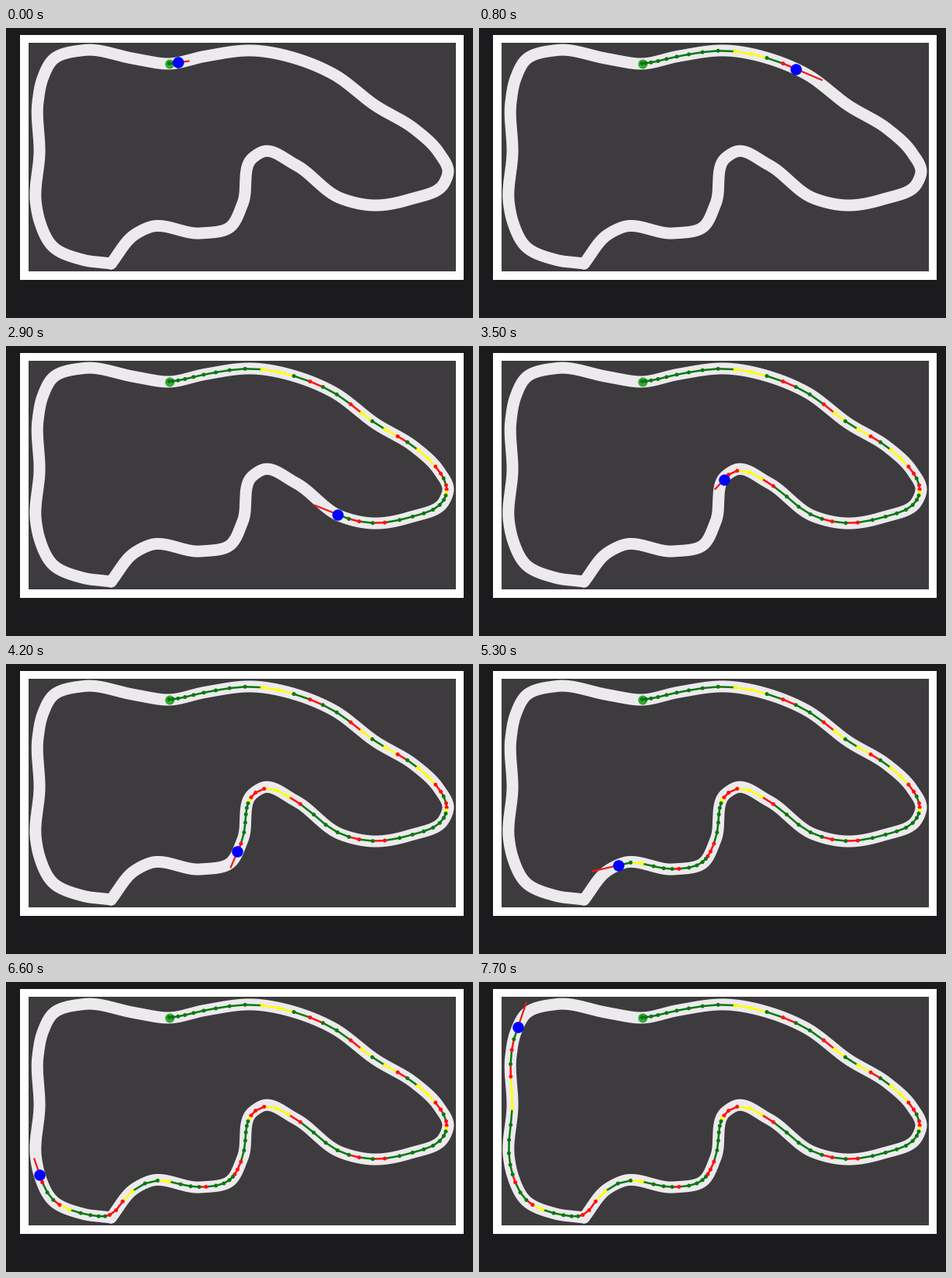
A matplotlib script for the animation above (7.8 s loop, 600 px wide and 373 px high).

```python
import numpy as np
import matplotlib.pyplot as plt
from matplotlib.animation import FuncAnimation
from matplotlib.collections import LineCollection
from matplotlib.patches import Rectangle

W, H, DPI = 600, 373, 100
FRAMES, INTERVAL = 78, 100
PX = 72 / DPI  # points per pixel
START = (210, 46)

# Bends of the road, clockwise from the sharp corner back to it
BENDS = [
    (135, 303), (98, 298), (60, 281), (43, 248), (38.5, 226), (43, 160),
    (41, 95), (47, 65), (60, 41), (100, 28.5), (165, 39.5), START,
    (255, 36.5), (318, 29), (375, 40), (420, 59), (475, 100), (525, 130),
    (556, 160), (568, 185), (562, 201), (520, 220), (470, 228), (430, 219),
    (372, 176), (330, 159), (317, 167), (304, 226), (288, 256), (250, 264),
    (185, 256), (165, 266), (135, 303),
]

# Go, roll or brake at each step, with the change of speed each one gives
PEDALS = ("gggggggggyygrggrygyrgyyrrgrrygggggggrgrggggryyrrry"
          "gggggrrrggggrgggyggyrrrggggyrggrgggggyyrgrgg")
PAINT = {"g": "#08780f", "y": "#ffff00", "r": "#ff1010"}
PUSH = {"g": 2.2, "y": -0.8, "r": -4}
COLORS = np.array([PAINT[p] for p in PEDALS])


def arc(points):
    """Distance travelled along a polyline at each of its points."""
    return np.r_[0, np.cumsum(np.hypot(*np.diff(points, axis=0).T))]


def walk(points, dist):
    """Points at the given distances along a polyline."""
    s = arc(points)
    return np.column_stack([np.interp(dist, s, c) for c in points.T])


def spline(knots, parts=30):
    """Cubic Hermite curve with tangents taken over chord length."""
    k = np.array(knots, float)
    t = arc(k)
    m = np.gradient(k, t, axis=0)
    h = np.diff(t)[:, None, None]
    u = np.linspace(0, 1, parts, endpoint=False)[None, :, None]
    a, b, p, q = k[:-1, None], k[1:, None], m[:-1, None], m[1:, None]
    curve = (a + (b - a) * u * u * (3 - 2 * u)
             + h * u * (1 - u) * (p * (1 - u) - q * u))
    return np.vstack([curve.reshape(-1, 2), k[-1]])


def racing_line(road, reach=15):
    """The road averaged over a short stretch, so that it cuts corners."""
    even = walk(road, np.arange(arc(road)[-1]))
    line = np.mean([np.roll(even, j, axis=0)
                    for j in range(-reach, reach + 1)], axis=0)
    first = np.argmin(np.hypot(*(line - START).T))
    return np.roll(line, -first, axis=0)


def drive(line):
    """Car positions, one per pedal, plus the start."""
    speed, dist = 2.5, [0]
    for pedal in PEDALS:
        speed = np.clip(speed + PUSH[pedal], 4, 22)
        dist.append(dist[-1] + speed)
    return walk(line, dist)


def box(x0, y0, x1, y1, color):
    ax.add_patch(Rectangle((x0, y0), x1 - x0, y1 - y0, color=color, lw=0))


def disc(xy, size, color, z):
    return ax.plot(*xy, "o", ms=size * PX, mfc=color, mew=0, zorder=z)[0]


fig = plt.figure(figsize=(W / DPI, H / DPI), dpi=DPI, facecolor="#1b1a1c")
ax = fig.add_axes([0, 0, 1, 1])
ax.set_xlim(0, W)
ax.set_ylim(H, 0)
ax.axis("off")

road = spline(BENDS)
path = drive(racing_line(road))
links = np.stack([path[:-1], path[1:]], axis=1)

box(18, 9, 588, 324, "#ffffff")
box(29, 18.5, 578, 312.5, "#3d3b3e")
ax.plot(*road.T, color="#eceaed", lw=15 * PX,
        solid_joinstyle="round", solid_capstyle="round")

disc(START, 12, "#35a835", 3)
trail = LineCollection([], linewidths=2.5 * PX, capstyle="round", zorder=4)
ax.add_collection(trail)
dots = ax.scatter([], [], s=(5 * PX) ** 2, linewidths=0, zorder=5)
arrow, = ax.plot([], [], color="#f01818", lw=2.2 * PX, zorder=6)
car = disc(START, 14.5, "#0000ff", 7)


def update(tick):
    # The pace of steps eases off slightly over the lap
    n = round(2 + 1.4 * tick - 0.00283 * tick**2)
    trail.set_segments(links[:n])
    trail.set_color(COLORS[:n])
    dots.set_offsets(path[:n])
    dots.set_facecolor(COLORS[:n])
    here = path[n]
    tip = here + 2 * (here - path[n - 1])
    arrow.set_data([here[0], tip[0]], [here[1], tip[1]])
    car.set_data([here[0]], [here[1]])
    return trail, dots, arrow, car


anim = FuncAnimation(fig, update, frames=FRAMES, interval=INTERVAL,
                     repeat=True, repeat_delay=0, blit=False)
plt.show()
```
